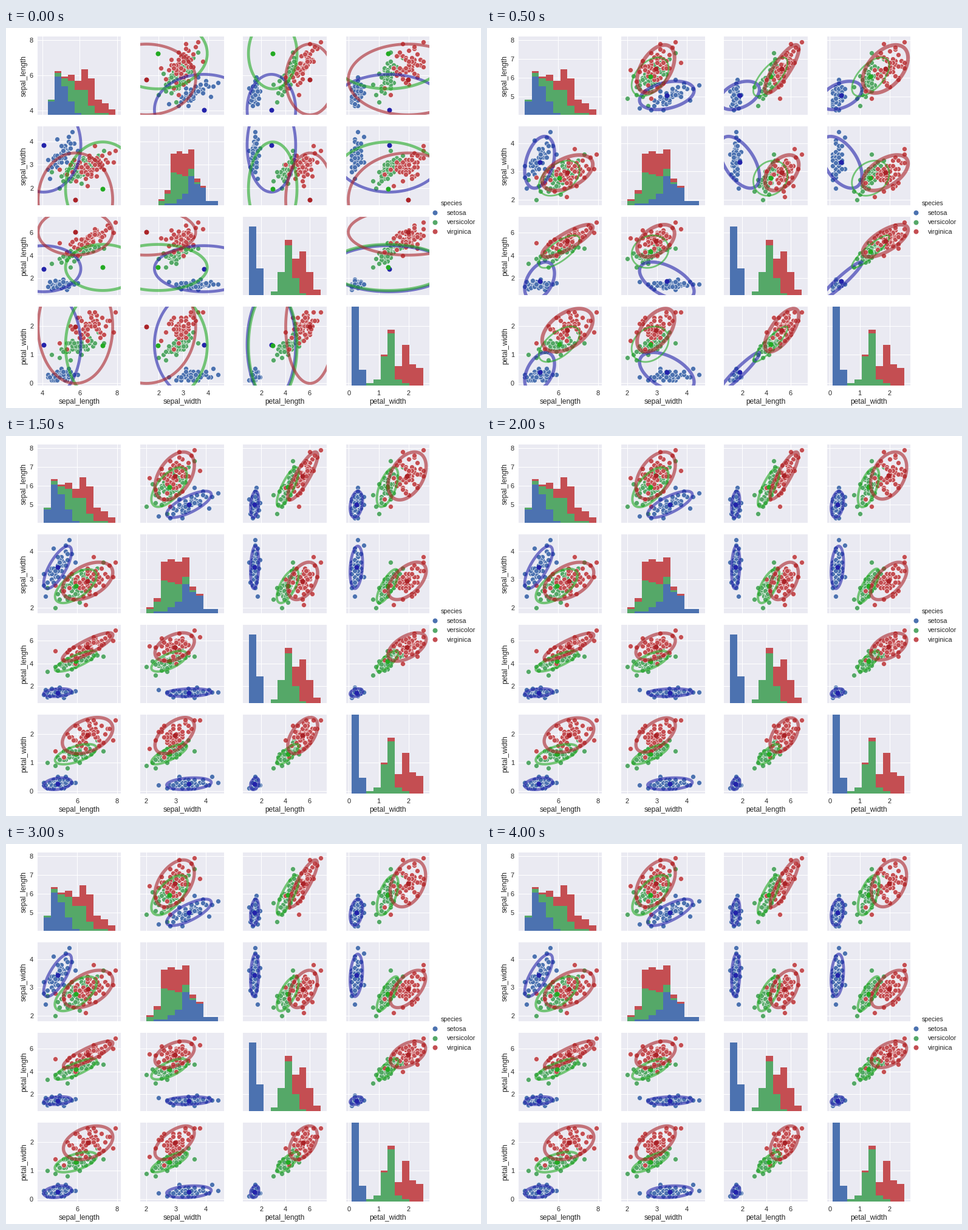
These frames come from a looping animation (782x626 px, 4250 ms). A matplotlib script:

```python
import numpy as np
import matplotlib.pyplot as plt
from matplotlib.animation import FuncAnimation
from matplotlib.lines import Line2D
from matplotlib.patches import Polygon
from matplotlib.ticker import MultipleLocator

W, H, DPI = 782, 626, 64
PT = 72 / DPI  # points per pixel
INK = "#262626"
STEPS = 17
FEATURES = ["sepal_length", "sepal_width", "petal_length", "petal_width"]
SPECIES = ["setosa", "versicolor", "virginica"]
PALETTE = ["#4C72B0", "#55A868", "#C44E52"]
CLUSTER = ["#2323AA", "#23AA23", "#AA2328"]

plt.rcParams.update({
    "font.family": "Liberation Sans", "font.size": 11 * PT,
    "text.color": INK, "xtick.labelcolor": INK, "ytick.labelcolor": INK,
})

LOW = np.array([4.3, 2.0, 1.0, 0.1])
HIGH = np.array([7.9, 4.4, 6.9, 2.5])
# Per species: mean, deviation, correlations (01, 02, 03, 12, 13, 23), share
MODEL = [
    ([5.01, 3.43, 1.46, .25], [.35, .375, .17, .105],
     [.74, .27, .28, .18, .23, .33], .333),
    ([5.92, 2.78, 4.20, 1.30], [.525, .305, .45, .18],
     [.61, .79, .58, .67, .79, .76], .3),
    ([6.55, 2.95, 5.48, 1.985], [.62, .33, .57, .293],
     [.45, .85, .33, .44, .58, .44], .367),
]
FIRST_MEANS = np.array([
    [4.06, 3.83, 2.84, 1.35], [7.24, 1.97, 2.95, 1.31],
    [5.77, 1.50, 6.02, 1.98],
])
rng = np.random.default_rng(7)


def gaussian(n, corr):
    """Normals with zero mean, unit variance and exactly these correlations."""
    c = np.zeros((4, 4))
    c[np.triu_indices(4, 1)] = corr
    z = rng.standard_normal((n, 4))
    z -= z.mean(0)
    z = z @ np.linalg.inv(np.linalg.cholesky(np.cov(z.T))).T
    return z @ np.linalg.cholesky(c + c.T + np.eye(4)).T


def flowers(mean, sd, corr, _, n=50):
    """Evenly spread bell-shaped values, paired up by correlated ranks."""
    rank = gaussian(n, corr).argsort(0).argsort(0)
    p = (rank + .5) / n
    x = mean + np.log(p / (1 - p)) / 1.75 * sd
    return np.clip(x, LOW, HIGH).round(1)


def responsibilities(x, means, covs, weights):
    logp = []
    for m, c, w in zip(means, covs, weights):
        d = x - m
        dist = ((d @ np.linalg.inv(c)) * d).sum(1)
        logp.append(np.log(w) - .5 * (dist + np.linalg.slogdet(c)[1]))
    logp = np.array(logp)
    p = np.exp(logp - logp.max(0))
    return p / p.sum(0)


def em_step(x, state):
    resp = responsibilities(x, *state)
    size = resp.sum(1)
    means = resp @ x / size[:, None]
    covs = [(r[:, None] * (x - m)).T @ (x - m) / s
            for r, m, s in zip(resp, means, size)]
    return means, covs, size / len(x)


def fit():
    """Mixture after each step, fitted to a dense crowd of the model."""
    crowd = np.vstack([mean + gaussian(int(3000 * share), corr) * sd
                       for mean, sd, corr, share in MODEL])
    states = [(FIRST_MEANS, [np.eye(4)] * 3, np.full(3, 1 / 3))]
    while len(states) < STEPS:
        states.append(em_step(crowd, states[-1]))
    return states


fig = plt.figure(figsize=(W / DPI, H / DPI), dpi=DPI, facecolor="white")


def label(x, y, text, size=12, **kw):
    fig.text(x / W, 1 - y / H, text, fontsize=size * PT, va="baseline", **kw)


def panel(row, col):
    w, h = 137.4, 129.4
    left, top = 52 + 169.2 * col, 14 + 148.4 * row
    ax = fig.add_axes([left / W, 1 - (top + h) / H, w / W, h / H],
                      facecolor="#EAEAF2")
    ax.set_axisbelow(True)
    ax.grid(color="white", lw=PT)
    ax.spines[:].set_visible(False)
    ax.tick_params(length=0, labelbottom=row == 3, labelleft=col == 0)
    ax.tick_params(axis="x", pad=8 * PT)
    ax.tick_params(axis="y", pad=7 * PT)
    if row == 3:
        label(left + w / 2, 619, FEATURES[col], ha="center")
    if col == 0:
        label(33, top + h / 2, FEATURES[row], ha="center", rotation=90,
              rotation_mode="anchor")
    return ax


def histogram(ax, f):
    edges = np.linspace(LOW[f], HIGH[f], 11)
    base = np.zeros(10)
    for x, color in zip(data, PALETTE):
        bars = np.histogram(x[:, f], edges)[0] / 41
        ax.bar(edges[:-1], bars, np.diff(edges), bottom=base, align="edge",
               color=color, lw=0, zorder=2,
               transform=ax.get_xaxis_transform())
        base += bars


data = [flowers(*m) for m in MODEL]
states = fit()
axes = [[panel(r, c) for c in range(4)] for r in range(4)]
marks = []
for r in range(4):
    for c in range(4):
        ax = axes[r][c]
        if r == c:
            histogram(ax, r)
            continue
        for x, color in zip(data, PALETTE):
            ax.plot(x[:, c], x[:, r], "o", color=color, ms=8 * PT,
                    mec="white", mew=.6 * PT, zorder=2)
        for k, color in enumerate(CLUSTER):
            dot, = ax.plot([], [], "o", color=color, ms=8 * PT, mew=0,
                           zorder=3)
            ring = Polygon(np.zeros((3, 2)), fill=False, ec=color, alpha=.6,
                           zorder=3)
            ax.add_patch(ring)
            marks.append((r, c, k, dot, ring))

label(716, 292.5, "species", 10.5)
for i, (name, color) in enumerate(zip(SPECIES, PALETTE)):
    y = 304 + 15.6 * i
    fig.add_artist(Line2D([706 / W], [1 - y / H], marker="o", ls="",
                          color=color, ms=8 * PT, mew=0))
    label(726, y + 3.7, name, 11)

angle = np.linspace(0, 2 * np.pi, 120, endpoint=False)
CIRCLE = np.array([np.cos(angle), np.sin(angle)])


def scale(axis, lo, hi, pad, roomy):
    """Pad the limits and space the ticks by 1, or by 2 on a long span."""
    margin = pad * (hi - lo)
    axis.set_view_interval(lo - margin, hi + margin, ignore=True)
    span = hi - lo + 2 * margin
    axis.set_major_locator(MultipleLocator(2 if span > roomy else 1))


def draw(step):
    means, covs, weights = states[step]
    lo = np.minimum(LOW, means.min(0))
    hi = np.maximum(HIGH, means.max(0))
    for r in range(4):
        for c in range(4):
            scale(axes[r][c].xaxis, lo[c], hi[c], .083, 4)
            scale(axes[r][c].yaxis, lo[r], hi[r], .078, 4.3)
    for r, c, k, dot, ring in marks:
        pair = [c, r]
        mean = means[k][pair]
        root = np.linalg.cholesky(covs[k][np.ix_(pair, pair)])
        ring.set_xy((mean[:, None] + 2 * root @ CIRCLE).T)
        ring.set_linewidth(14.2 * weights[k] * PT)
        dot.set_data(mean[:1], mean[1:])
    return []


for ax in fig.axes:
    ax.autoscale(False)
anim = FuncAnimation(fig, draw, frames=STEPS, init_func=lambda: draw(0),
                     interval=250, repeat=True, repeat_delay=0, blit=False)
plt.show()
```
